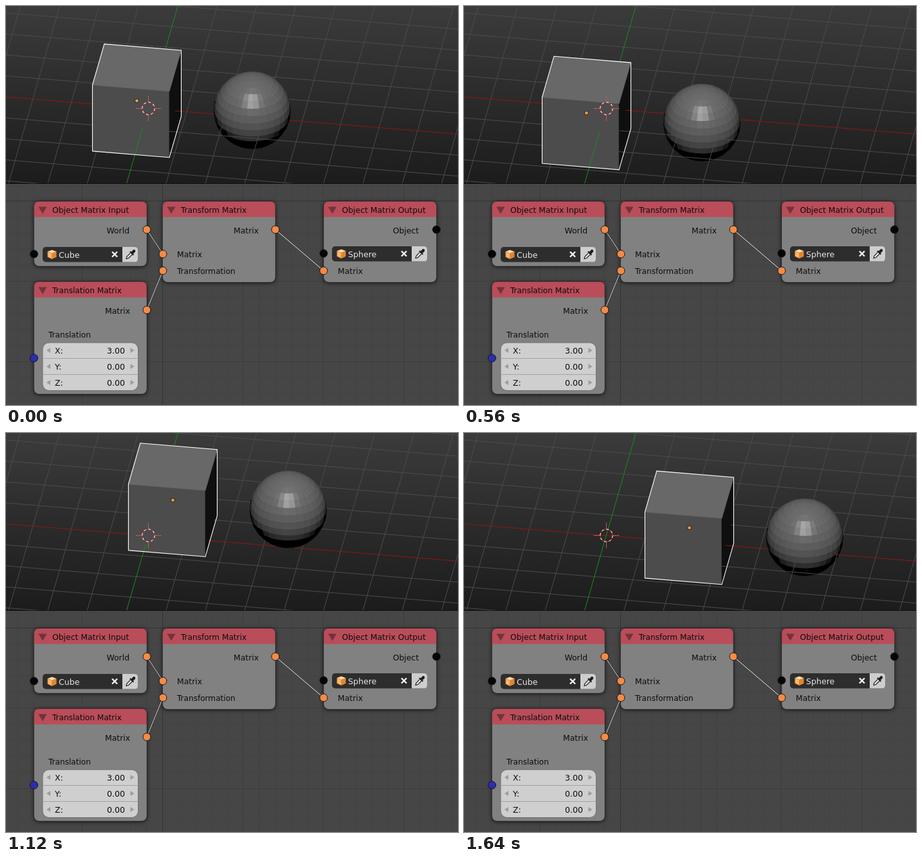
Animation, 703 px wide and 621 px high, one loop 1680 ms. Source, as an HTML page with a canvas:

```html
<!DOCTYPE html>
<html lang="en">
<head>
<meta charset="utf-8">
<title>Matrix nodes</title>
<style>
  html, body { margin: 0; width: 100%; height: 100%; overflow: hidden; background: #454545; }
  canvas, svg { position: absolute; left: 0; top: 0; display: block; }
  text { font-family: "DejaVu Sans", sans-serif; }
  .node { filter: drop-shadow(0 1px 3px rgba(0, 0, 0, .75)); }
</style>
</head>
<body>
<svg id="editor" width="703" height="621" viewBox="0 0 703 621"></svg>
<canvas id="view" width="703" height="276"></canvas>
<script>
// ---------- node editor ----------
const ORANGE = '#f68a46', BLACK = '#050505', BLUE = '#2c2cb4';

const line = (x1, y1, x2, y2, color, w = 1) =>
  `<path d="M${x1} ${y1}L${x2} ${y2}" stroke="${color}" stroke-width="${w}" fill="none"/>`;
const rect = (x, y, w, h, fill, r = 0, stroke = 'none') =>
  `<rect x="${x}" y="${y}" width="${w}" height="${h}" rx="${r}" fill="${fill}" stroke="${stroke}"/>`;
const shape = (d, fill) => `<path d="${d}" fill="${fill}"/>`;
const label = (x, y, s, { end = false, size = 12.4, fill = '#0c0c0c' } = {}) =>
  `<text x="${x}" y="${y}" font-size="${size}" fill="${fill}"${end ? ' text-anchor="end"' : ''}>${s}</text>`;
const socket = (x, y, fill) =>
  `<circle cx="${x}" cy="${y}" r="6" fill="${fill}" stroke="#151515" stroke-width="1"/>`;

function backdrop() {
  let s = rect(0, 276, 703, 345, '#464646');
  const tone = (v, axis) => v === axis ? '#343434' : (v - axis) % 125 === 0 ? '#3d3d3d' : '#424242';
  for (let x = 18; x < 703; x += 25) s += line(x + .5, 277, x + .5, 621, tone(x, 243));
  for (let y = 278; y < 621; y += 25) s += line(0, y + .5, 703, y + .5, tone(y, 303));
  return s + rect(0, 276, 703, 1, '#0e0e0e') + rect(0, 277, 703, 1, '#525252');
}

function node(x, y, h, title, size) {
  const w = 175.5;
  return `<g class="node">${rect(x, y, w, h, '#818181', 8)}</g>` +
    shape(`M${x} ${y + 24.5}v-16.5q0 -8 8 -8h${w - 16}q8 0 8 8v16.5z`, '#b94d5a') +
    rect(x, y, w, h, 'none', 8, 'rgba(0,0,0,.3)') +
    shape(`M${x + 7} ${y + 8.5}h13l-6.5 11z`, '#71333b') +
    label(x + 28.5, y + 18, title, { size });
}

function cubeIcon(x, y) {
  return shape(`M${x} ${y - 7}l7 2.6v8.6l-7 3.3l-7 -3.3v-8.6z`, '#e08630') +
    shape(`M${x} ${y - 6.5}l6 2.2l-6 2.6l-6 -2.6z`, '#fbdfb9') +
    shape(`M${x - 6.2} ${y - 3.4}l5.7 2.5v7.3l-5.7 -2.7z`, '#f7b872');
}

function dropper(x, y) {
  return `<g transform="translate(${x} ${y}) rotate(45)">` +
    rect(-2.2, -10, 4.4, 7, '#1c1c1c', 2) + rect(-4, -4.2, 8, 2.4, '#1c1c1c', 1) +
    `<path d="M-1.8 -1.5v7.5l1.8 3l1.8 -3v-7.5" fill="#eee" stroke="#1c1c1c" stroke-width="1.2"/></g>`;
}

function objectField(x, y, name) {
  const cy = y + 11.5, cx = x + 112;
  return rect(x, y, 148, 23.5, '#2d2d2d', 5) +
    shape(`M${x + 124} ${y}h19q5 0 5 5v13.5q0 5 -5 5h-19z`, '#cecece') +
    cubeIcon(x + 14.5, cy) +
    label(x + 25, y + 17, name, { size: 12.6, fill: '#e6e6e6' }) +
    line(cx - 4, cy - 4, cx + 4, cy + 4, '#f2f2f2', 2.4) +
    line(cx - 4, cy + 4, cx + 4, cy - 4, '#f2f2f2', 2.4) +
    dropper(x + 136.5, cy + .5);
}

function vectorField(x, y) {
  let s = rect(x, y, 148.5, 74.5, '#cfcfcf', 10, '#707070');
  ['X:', 'Y:', 'Z:'].forEach((axis, i) => {
    const cy = y + 12 + i * 25;
    if (i) s += line(x, y + i * 25 - .5, x + 148.5, y + i * 25 - .5, '#a2a2a2');
    s += shape(`M${x + 12} ${cy - 4}v8l-6 -4z`, '#9d9d9d') +
      shape(`M${x + 136.5} ${cy - 4}v8l6 -4z`, '#9d9d9d') +
      label(x + 19, cy + 5, axis) +
      label(x + 128, cy + 5, i ? '0.00' : '3.00', { end: true, size: 12.6 });
  });
  return s;
}

const links = [[219, 348, 244, 386], [219, 473, 244, 412], [419, 348, 494, 412]];
const right = { end: true };

document.getElementById('editor').innerHTML = backdrop() +
  node(43.5, 304, 101, 'Object Matrix Input', 12.4) +
  label(192, 354, 'World', right) + objectField(57, 375, 'Cube') +
  node(43.5, 429, 175, 'Translation Matrix', 12.1) +
  label(193, 479, 'Matrix', right) + label(66, 516, 'Translation', { size: 12.1 }) + vectorField(57, 524) +
  node(243.5, 304, 126, 'Transform Matrix', 12.1) +
  label(393, 354, 'Matrix', right) + label(266, 391, 'Matrix') + label(266, 417, 'Transformation', { size: 12.1 }) +
  node(494, 304, 126, 'Object Matrix Output', 12.4) +
  label(642, 354, 'Object', right) + objectField(507, 374, 'Sphere') + label(516, 417, 'Matrix') +
  links.map(l => line(...l, '#2a2a2a', 2.4) + line(...l, '#c4c4c4', 1.1)).join('') +
  [[219, 348], [219, 473], [244, 386], [244, 412], [419, 348], [494, 412]]
    .map(p => socket(...p, ORANGE)).join('') +
  [[43.5, 386], [494, 385], [669.5, 348]].map(p => socket(...p, BLACK)).join('') +
  socket(43.5, 548, BLUE);

// ---------- 3D view, orthographic ----------
const ctx = document.getElementById('view').getContext('2d');
const UNIT = 60.55, BALL = .985, ORIGIN = [221.2, 159.7];
const RIGHT = [.988, .152, 0], UP = [-.0815, .527, .85], TOWARD = [.129, -.84, .533];
const dot = (a, b) => a[0] * b[0] + a[1] * b[1] + a[2] * b[2];
const project = p => [ORIGIN[0] + UNIT * dot(p, RIGHT), ORIGIN[1] - UNIT * dot(p, UP)];

function trace(points) {
  points.map(project).forEach(([x, y], i) => i ? ctx.lineTo(x, y) : ctx.moveTo(x, y));
  ctx.closePath();
}

function shade(n) {
  const u = dot(n, UP), d = dot(n, TOWARD);
  const diffuse = Math.max(0, .082 * u + .147 * d - .0104);
  const shine = .26 * Math.max(0, .23 * u + .973 * d) ** 60;
  const v = Math.round(255 * (diffuse + shine) ** (1 / 2.2));
  return `rgb(${v},${v},${v})`;
}

function stroke(a, b, color) {
  ctx.strokeStyle = color;
  ctx.beginPath();
  ctx.moveTo(...project(a));
  ctx.lineTo(...project(b));
  ctx.stroke();
}

function ground() {
  const R = 24;
  ctx.lineWidth = 1;
  for (let i = -R; i <= R; i++) {
    if (!i) continue;
    stroke([i, -R, 0], [i, R, 0], '#4c4c4c');
    stroke([-R, i, 0], [R, i, 0], '#4c4c4c');
  }
  stroke([-R, 0, 0], [R, 0, 0], '#921515');
  stroke([0, -R, 0], [0, R, 0], '#1c8c1c');
}

function drawCube(c) {
  const at = (x, y, z) => [c[0] + x, c[1] + y, c[2] + z];
  const faces = [
    [[0, -1, 0], at(-1, -1, -1), at(1, -1, -1), at(1, -1, 1), at(-1, -1, 1)],
    [[1, 0, 0], at(1, -1, -1), at(1, 1, -1), at(1, 1, 1), at(1, -1, 1)],
    [[0, 0, 1], at(-1, -1, 1), at(1, -1, 1), at(1, 1, 1), at(-1, 1, 1)]
  ];
  ctx.lineWidth = .7;
  for (const [n, ...quad] of faces) {
    ctx.beginPath();
    trace(quad);
    ctx.fillStyle = ctx.strokeStyle = shade(n);
    ctx.fill();
    ctx.stroke();
  }
  const outline = [at(-1, -1, -1), at(1, -1, -1), at(1, 1, -1), at(1, 1, 1), at(-1, 1, 1), at(-1, -1, 1)];

  // floor lines lying in front of the front or right face
  const F = 40, y = c[1] - 1, x = c[0] + 1;
  ctx.save();
  ctx.beginPath();
  trace(outline);
  ctx.clip();
  ctx.beginPath();
  trace([[-F, -F, 0], [F, -F, 0], [F, y, 0], [-F, y, 0]]);
  trace([[x, -F, 0], [F, -F, 0], [F, F, 0], [x, F, 0]]);
  ctx.clip();
  ground();
  ctx.restore();

  ctx.beginPath();
  trace(outline);
  ctx.strokeStyle = '#fff';
  ctx.lineWidth = 1.1;
  ctx.stroke();
}

function drawSphere(c) {
  const SEG = 32, RINGS = 16;
  const ball = (lat, lon) => [Math.sin(lat) * Math.cos(lon), Math.sin(lat) * Math.sin(lon), Math.cos(lat)];
  const la = Math.PI / RINGS, lo = 2 * Math.PI / SEG;
  ctx.lineWidth = .7;
  for (let i = 0; i < RINGS; i++) for (let j = 0; j < SEG; j++) {
    const n = ball((i + .5) * la, (j + .5) * lo);
    if (dot(n, TOWARD) < -.02) continue;
    const quad = [[i, j], [i + 1, j], [i + 1, j + 1], [i, j + 1]]
      .map(([a, b]) => ball(a * la, b * lo).map((v, k) => v * BALL + c[k]));
    ctx.beginPath();
    trace(quad);
    ctx.fillStyle = ctx.strokeStyle = shade(n);
    ctx.fill();
    ctx.stroke();
  }

  // floor lines lying in front of the lower part
  const [sx, sy] = project(c), [fx, fy] = project([c[0], c[1], 0]);
  const front = ORIGIN[1] + UNIT * dot(c, TOWARD) * TOWARD[2] / UP[2];
  const cut = UNIT * Math.sqrt(Math.max(0, BALL * BALL - c[2] * c[2]));
  ctx.save();
  ctx.beginPath();
  ctx.arc(sx, sy, UNIT * BALL, 0, 7);
  ctx.clip();
  ctx.beginPath();
  ctx.rect(0, front, 703, 300);
  ctx.clip();
  ctx.beginPath();
  ctx.rect(0, 0, 703, 300);
  ctx.ellipse(fx, fy, cut, cut * TOWARD[2], 0, 0, 2 * Math.PI);
  ctx.clip('evenodd');
  ground();
  ctx.restore();
}

function drawCursor() {
  const x = 221.5, y = 159.5, r = 9.7, N = 16;
  ctx.lineWidth = 1;
  ctx.strokeStyle = '#ae6060';
  ctx.beginPath();
  for (const [dx, dy] of [[1, 0], [-1, 0], [0, 1], [0, -1]]) {
    ctx.moveTo(x + dx * 9, y + dy * 9);
    ctx.lineTo(x + dx * 20, y + dy * 20);
  }
  ctx.stroke();
  ctx.lineWidth = 1.1;
  for (let i = 0; i < N; i++) {
    ctx.strokeStyle = i % 2 ? '#f01414' : '#fff';
    ctx.beginPath();
    ctx.arc(x, y, r, i * 2 * Math.PI / N, (i + 1) * 2 * Math.PI / N);
    ctx.stroke();
  }
}

// ---------- motion: time, x, y of the cube's centre ----------
const PERIOD = 1680, STEP = 40;
const PATH = [
  [0, 203, 147], [80, 195, 140], [180, 159, 123], [260, 136, 118], [360, 130, 126],
  [460, 147, 151], [560, 190, 166], [660, 252, 164], [760, 312, 150], [860, 335, 127],
  [980, 312, 108], [1120, 259, 104], [1240, 217, 115], [1360, 192, 139], [1420, 191, 159],
  [1490, 228, 173], [1550, 307, 169], [1600, 352, 157], [1640, 350, 147]
];

function place(t) {
  const last = PATH.length - 1;
  let i = 0;
  while (i < last - 1 && PATH[i + 1][0] <= t) i++;
  const a = PATH[i], b = PATH[i + 1], h = b[0] - a[0], s = Math.min(1, (t - a[0]) / h);
  const slope = (k, d) => {
    const p = PATH[Math.max(0, k - 1)], q = PATH[Math.min(last, k + 1)];
    return (q[d] - p[d]) / (q[0] - p[0]);
  };
  const s2 = s * s, s3 = s2 * s;
  return [1, 2].map(d => Math.round(
    (2 * s3 - 3 * s2 + 1) * a[d] + (s3 - 2 * s2 + s) * h * slope(i, d) +
    (3 * s2 - 2 * s3) * b[d] + (s3 - s2) * h * slope(i + 1, d)) + .5);
}

function draw(t) {
  const [x, y] = place(t);
  const a = (x - ORIGIN[0]) / UNIT, b = (ORIGIN[1] - y) / UNIT;
  const cube = RIGHT.map((r, k) => a * r + b * UP[k]);
  const sky = ctx.createLinearGradient(0, 0, 0, 276);
  sky.addColorStop(0, '#3b3b3b');
  sky.addColorStop(1, '#1c1c1c');
  ctx.fillStyle = sky;
  ctx.fillRect(0, 0, 703, 276);
  ground();
  drawSphere([cube[0] + 3, cube[1], cube[2]]);
  drawCube(cube);
  drawCursor();
  ctx.beginPath();
  ctx.arc(x, y, 3, 0, 7);
  ctx.fillStyle = '#e39a4c';
  ctx.fill();
  ctx.strokeStyle = '#1c1208';
  ctx.lineWidth = 1;
  ctx.stroke();
}

let shown = -1;
function tick() {
  const t = Math.floor(performance.now() % PERIOD / STEP) * STEP;
  if (t !== shown) draw(shown = t);
  requestAnimationFrame(tick);
}
tick();
</script>
</body>
</html>
```
